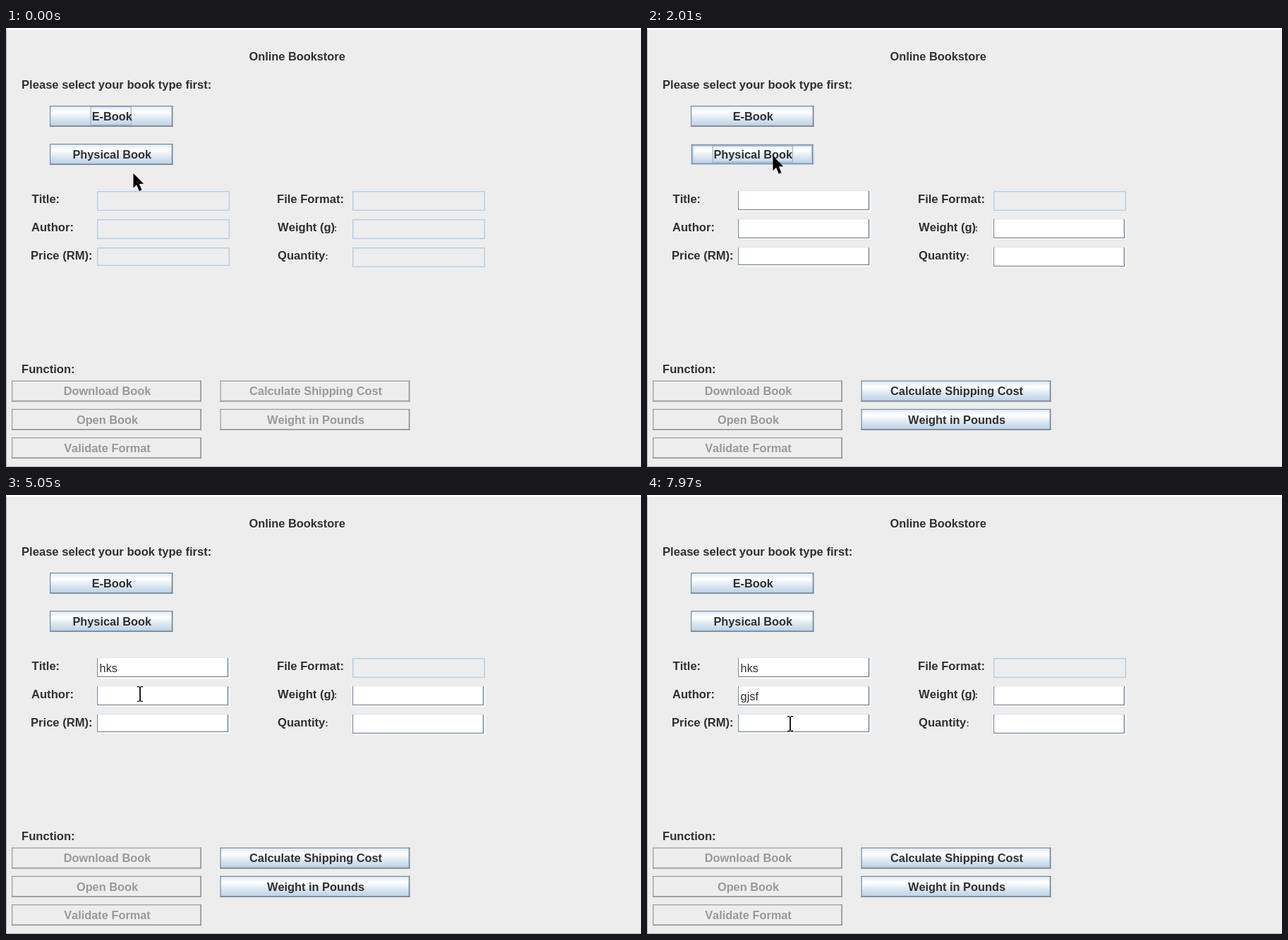
Recreate the animation shown at these times as an HTML page with a canvas. Size 900 by 622 pixels, loop 8 s.

```html
<!DOCTYPE html>
<html lang="en">
<head>
<meta charset="utf-8">
<title>Online Bookstore</title>
<style>
html, body { margin: 0; width: 100%; height: 100%; overflow: hidden; background: #ededed; }
canvas { display: block; }
</style>
</head>
<body>
<canvas id="stage" width="900" height="622"></canvas>
<script>
const ctx = document.getElementById('stage').getContext('2d');
const LOOP = 8000;
const FONT = '"Liberation Sans", Arial, sans-serif';
const BG = '#ededed', INK = '#303030', GREY = '#999', EDGE = '#7a8a99', PALE = '#b8cfe5';
const ENABLE = 2010;

// start, end, steps, target x, target y
const moves = [
  [720, 1210, 8, 178.5, 181.5],
  [2410, 2890, 8, 191, 245],
  [3225, 3300, 2, 188, 246],
  [4650, 5050, 6, 190, 282],
  [5120, 5190, 2, 193, 284],
  [6770, 7240, 7, 203, 324]
];
const presses = [[1740, 2010], [3150, 3300], [5390, 5660], [7510, 7710]];
// time, field holding a visible caret (-1: none)
const carets = [
  [0, -1], [3150, 0], [3630, -1], [3830, 0], [4570, -1], [5120, 0],
  [5390, 1], [6690, -1], [7240, 1], [7510, 2], [7970, -1]
];
const fields = [
  { x: 129, y: 231, h: 28, text: 'hks', keys: [3830, 3960, 4110] },
  { x: 129, y: 271, h: 28, text: 'gjsf', keys: [5760, 5860, 6060, 6160] },
  { x: 129, y: 311, h: 26 },
  { x: 491, y: 231, h: 28, locked: true },
  { x: 491, y: 271, h: 28 },
  { x: 491, y: 311, h: 28 }
];
const FIELD_W = 188;

const labels = [
  ['Please select your book type first:', 22, 86],
  ['Title:', 36.5, 247.5], ['Author:', 36, 288], ['Price (RM):', 35, 328],
  ['File Format:', 384, 247.5], ['Weight (g)', 385, 288], ['Quantity', 385, 328],
  ['Function:', 22, 489]
];

function rect(x, y, w, h, color) {
  ctx.fillStyle = color;
  ctx.fillRect(x, y, w, h);
}

function frame(x, y, w, h, color, thin, thick = thin) {
  rect(x, y, w, thin, color);
  rect(x, y, thin, h, color);
  rect(x, y + h - thick, w, thick, color);
  rect(x + w - thick, y, thick, h, color);
}

function text(str, x, y, size = 16.6, color = INK, weight = 'bold', align = 'left') {
  ctx.font = `${weight} ${size}px ${FONT}`;
  ctx.textAlign = align;
  ctx.fillStyle = color;
  ctx.fillText(str, x, y);
}

function button(str, x, y, w, { on = true, hover, pressed, focus } = {}) {
  const h = 30;
  if (on) {
    const g = ctx.createLinearGradient(0, y, 0, y + h);
    g.addColorStop(0, '#dde8f3');
    g.addColorStop(0.3, '#fff');
    g.addColorStop(0.6, '#dde8f3');
    g.addColorStop(1, PALE);
    rect(x, y, w, h, pressed ? PALE : g);
  }
  if (hover) {
    frame(x, y, w, h, '#c3d5e6', 1.3);
    frame(x + 1.2, y + 1.2, w - 2.4, h - 2.4, '#6f8398', 1.4);
    frame(x + 2.6, y + 2.6, w - 5.2, h - 5.2, PALE, 1.2);
  } else {
    frame(x, y, w, h, on ? EDGE : GREY, 1.2, 1.8);
  }
  if (focus) {
    const [l, r] = focus;
    const inset = hover ? 2.4 : 1;
    frame(l, y + inset, r - l, h - 1 - 2 * inset, '#a3b8cc', 1.3);
  }
  text(str, x + w / 2 + 1, y + 20.7, 16.35, on ? INK : GREY, 'bold', 'center');
}

function typed(f, t) {
  return f.keys ? f.text.slice(0, f.keys.filter(k => t >= k).length) : '';
}

function drawField(f, t, caret) {
  const { x, y, h } = f;
  if (t < ENABLE || f.locked) {
    frame(x, y, FIELD_W, h, '#b4cee5', 1.4);
    return;
  }
  rect(x - 0.5, y - 1, FIELD_W + 1, h + 2, '#fff');
  rect(x, y - 0.6, FIELD_W - 2, 0.7, '#cdd2d8');
  rect(x, y, 1.1, h - 1, EDGE);
  rect(x, y + h - 2.2, FIELD_W - 2, 1.3, EDGE);
  rect(x + FIELD_W - 3.3, y, 1.6, h - 1, EDGE);
  const str = typed(f, t);
  text(str, x + 3.6, y + 20.2, 16.3, INK, 'normal');
  if (caret) rect(x + 2.8 + ctx.measureText(str).width, y + 3, 1.7, h - 5, '#222');
}

function cursorAt(t) {
  let x = 180.5, y = 206;
  for (const [start, end, n, tx, ty] of moves) {
    if (t < start) break;
    const gap = (end - start) / (n - 1);
    const u = Math.min(n, Math.floor((t - start) / gap + 1e-6) + 1) / n;
    const k = u * u * (3 - 2 * u);
    x += (tx - x) * k;
    y += (ty - y) * k;
  }
  return { x, y };
}

function drawArrow(x, y) {
  const pts = [0, 0, 0, 20.5, 4.6, 16.3, 8.3, 25, 12, 23.4, 8.4, 15, 14.6, 14.6];
  ctx.beginPath();
  for (let i = 0; i < pts.length; i += 2) ctx.lineTo(x + pts[i], y + pts[i + 1]);
  ctx.closePath();
  ctx.fillStyle = '#000';
  ctx.fill();
}

function drawBeam(x, y) {
  rect(x - 0.9, y - 10, 1.8, 20, '#000');
  for (const dy of [-11, 9.7]) {
    rect(x - 4, y + dy, 3.3, 1.3, '#000');
    rect(x + 0.7, y + dy, 3.3, 1.3, '#000');
  }
}

function draw(t) {
  const { x, y } = cursorAt(t);
  const down = presses.some(([a, b]) => t >= a && t < b);
  const caret = carets.filter(c => t >= c[0]).pop()[1];
  const on = t >= ENABLE;

  rect(0, 0, 900, 622, BG);
  rect(0, 0, 900, 2.5, '#fff');
  rect(0, 2, 1, 620, '#b5b5b5');
  rect(0, 621, 900, 1, '#b5b5b5');

  text('Online Bookstore', 344.5, 46, 16.35);
  for (const label of labels) text(...label);
  text(':', 465, 288, 12);
  text(':', 452.5, 328, 12);

  button('E-Book', 62, 110, 174.5, { focus: t < 1740 && [119.5, 178] });
  button('Physical Book', 62, 164, 174.5, {
    hover: y < 194,
    pressed: down && y < 194,
    focus: t >= 1740 && t < 3150 && [92.5, 207]
  });
  ['Download Book', 'Open Book', 'Validate Format'].forEach((s, i) =>
    button(s, 8, 499.5 + i * 40.3, 269, { on: false }));
  ['Calculate Shipping Cost', 'Weight in Pounds'].forEach((s, i) =>
    button(s, 303.5, 499.5 + i * 40.3, 269, { on }));

  fields.forEach((f, i) => drawField(f, t, i === caret));

  if (down) {
    ctx.beginPath();
    ctx.arc(x, y - 0.5, 16, 0, Math.PI * 2);
    ctx.fillStyle = 'rgba(255, 255, 0, 0.47)';
    ctx.fill();
  }
  const overField = on && fields.some(f => !f.locked &&
    x > f.x && x < f.x + FIELD_W && y > f.y && y < f.y + f.h);
  (overField ? drawBeam : drawArrow)(x, y);
}

ctx.fontKerning = 'none';
const begin = performance.now();
function tick() {
  draw((performance.now() - begin) % LOOP);
  requestAnimationFrame(tick);
}
tick();
</script>
</body>
</html>
```
